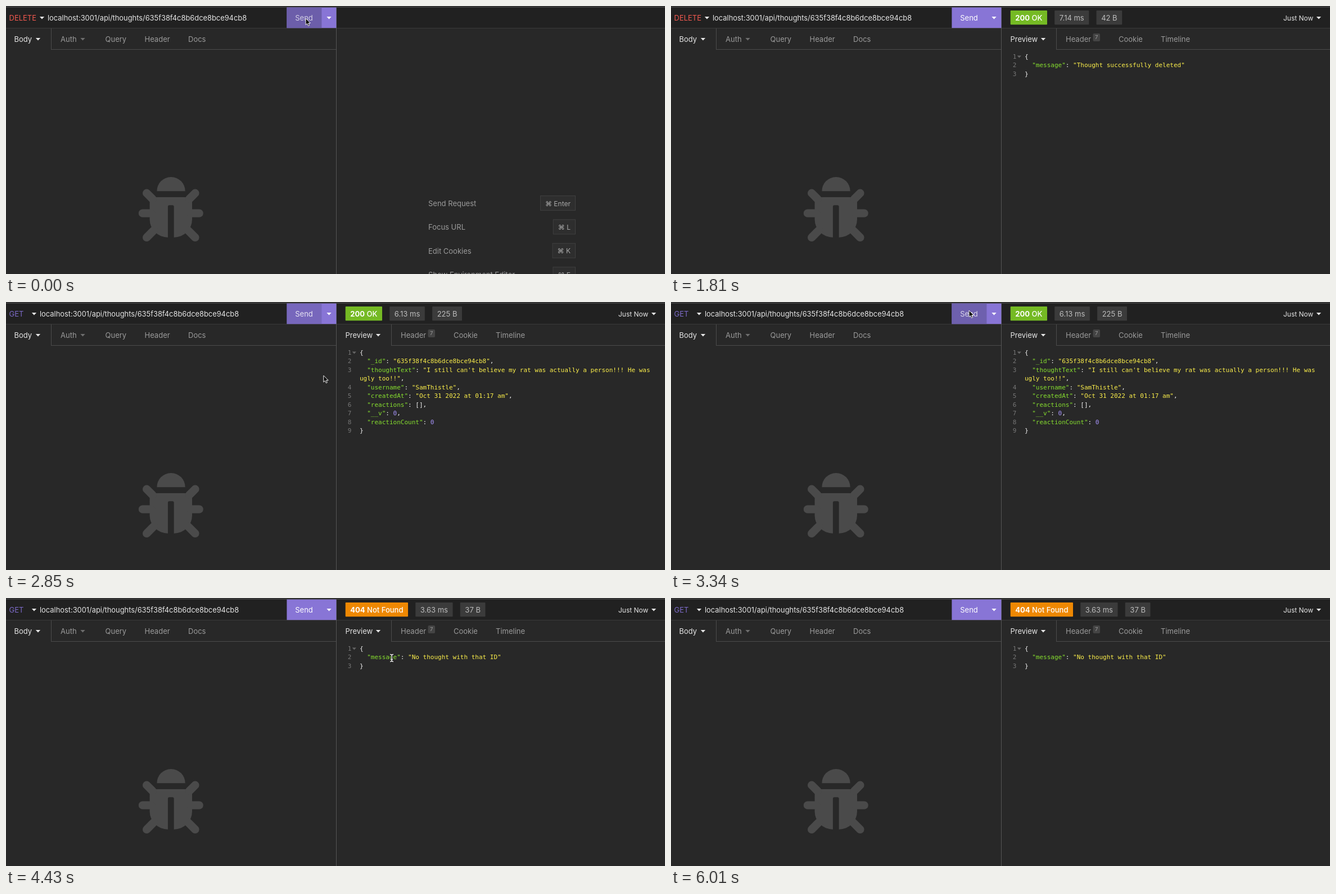
These frames come from a looping animation (1172x478 px, 6060 ms). An HTML page:

```html
<!DOCTYPE html>
<html lang="en">
<head>
<meta charset="utf-8">
<title>API client</title>
<style>
  html, body { margin: 0; width: 100%; height: 100%; overflow: hidden; background: #282828; }
  svg { display: block; width: 1172px; height: 478px; }
  text { font: 13px Inter, "DejaVu Sans", sans-serif; fill: #9b9b9b; white-space: pre; }
  .lit { fill: #e6e6e6; }
  .mid { text-anchor: middle; }
  .url { font-size: 12.87px; fill: #e6e6e6; }
  .age { font-size: 12px; fill: #e6e6e6; }
  .key { font-size: 12px; fill: #a9a9a9; }
  .badge { font-size: 9.5px; text-anchor: middle; }
  .chip { fill: #bdbdbd; }
  .status { fill: #fff; font-weight: 500; }
  .status tspan { font-weight: 700; }
  .code, .num { font: 11px "DejaVu Sans Mono", monospace; fill: #f2f2f2; }
  .num { fill: #777; text-anchor: end; }
  .code .prop { fill: #87e02f; }
  .code .str { fill: #fdf04b; }
  .code .val { fill: #a996ff; }
</style>
</head>
<body>
<svg id="stage" viewBox="0 0 1172 478"></svg>
<script>
const LOOP = 6060, BLINK = 535, FADE = 130;
const URL_TEXT = 'localhost:3001/api/thoughts/635f38f4c8b6dce8bce94cb8';
const GREEN = '#75ba24', ORANGE = '#ee8803', PURPLE = '#8875d6', LINE = '#4b4b4b';

const pen = document.createElement('canvas').getContext('2d');
function widthOf(str, font) {
  pen.font = font + ' Inter, "DejaVu Sans", sans-serif';
  return pen.measureText(str).width;
}

const rect = (x, y, w, h, fill, extra = '') =>
  `<rect x="${x}" y="${y}" width="${w}" height="${h}" fill="${fill}" ${extra}/>`;
// Text is placed by the middle of its line.
const text = (x, mid, str, cls = '', extra = '') =>
  `<text x="${x}" y="${mid + 4.7}" class="${cls}" ${extra}>${str}</text>`;
const caret = (x, y, fill = '#e6e6e6', r = 4.2) =>
  `<path d="M${x - r} ${y - r / 2}h${2 * r}l${-r} ${r * 1.1}z" fill="${fill}"/>`;
const group = (id, body) => `<g id="${id}">${body}</g>`;

function bug() {
  return `<g transform="translate(235.8 305) scale(.2246)" fill="#4a4a4a">
    <path d="M145 112a112 112 0 0 1 224 0z"/>
    <path d="M88 197L125 160H387L424 197V336A144 144 0 0 1 280 480V236q0-12-12-12h-24q-12 0-12 12V480A144 144 0 0 1 88 336z"/>
    <path d="M32 288H100M480 288H412M64 128L110 174M448 128L402 174M64 480L122 422M448 480L390 422"
      stroke="#4a4a4a" stroke-width="64" stroke-linecap="round"/></g>`;
}

function frame() {
  return rect(0, 0, 1172, 39, '#212121') +
    rect(0, 1, 1172, 1.5, '#484848') +
    rect(0, 39, 1172, 1, '#3a3a3a') +
    rect(80, 40, 1, 38, LINE) + rect(80, 77, 507, 1, LINE) +
    rect(587, 3, 1, 475, '#555') +
    text(14.5, 59, 'Body', 'lit') + caret(57, 59) +
    text(97, 59, 'Auth') + caret(136.5, 59, '#6e6e6e') +
    text(176.5, 59, 'Query') + text(246.5, 59, 'Header') + text(324, 59, 'Docs') +
    bug() +
    rect(499.4, 2.6, 88, 36.6, PURPLE) +
    rect(499.4, 2.6, 62, 36.6, '#6c5eaa', 'id="dim"') +
    text(530, 21, 'Send', 'mid', 'id="send" style="fill:#fff"') +
    caret(574.5, 21, '#fff');
}

function address(method, color, x) {
  return text(5.5, 21, method, '', `style="fill:${color}"`) +
    caret(x - 10, 21) + text(x, 21, URL_TEXT, 'url') +
    rect(Math.round(x + widthOf(URL_TEXT, '12.87px')), 12, 1, 18, '#e6e6e6', 'class="blink"');
}

function shortcuts() {
  const rows = { 'Send Request': 'Enter', 'Focus URL': 'L', 'Edit Cookies': 'K', 'Show Environment Editor': 'E' };
  return Object.entries(rows).map(([label, key], i) => {
    const y = 352 + i * 42.4, w = widthOf('⌘ ' + key, '12px') + 17, x = 1012.5 - w;
    return text(751, y, label) +
      rect(x, y - 13.5, w, 26, '#2e2e2e', 'stroke="#3f3f3f"') +
      text(x + 8.5, y - .2, '⌘ ' + key, 'key');
  }).join('');
}

function paint(line) {
  return line.replace(/^~[^"]*"|"[^"]*"|\d+/g, (part, at) => {
    const cls = /^\d/.test(part) ? 'val' : line[at + part.length] === ':' ? 'prop' : 'str';
    return `<tspan class="${cls}">${part.replace('~', '')}</tspan>`;
  });
}

// A line that starts with "~" continues the one before.
function code(source) {
  let n = 0;
  return source.split('\n').map((line, i) => {
    const y = 89.3 + i * 15.44, body = line.trimStart();
    const number = line[0] === '~' ? '' : text(614.3, y, ++n, 'num');
    return number + text(629 + (line.length - body.length) * 6.62, y, paint(body), 'code');
  }).join('');
}

function chips(color, status, reason, ...facts) {
  const box = (x, w, fill) => rect(x, 8, w, 25.2, fill, 'rx="1"');
  const pad = 8.6, gap = 13.2;
  let x = 603.7;
  let w = widthOf(status, '700 13px') + widthOf(' ' + reason, '500 13px') + 2 * pad;
  let out = box(x, w, color) + text(x + pad, 20.8, `<tspan>${status}</tspan> ${reason}`, 'status');
  for (const fact of facts) {
    x += w + gap;
    w = widthOf(fact, '13px') + 2 * pad;
    out += box(x, w, '#3b3b3b') + text(x + pad, 20.8, fact, 'chip');
  }
  return out;
}

function response(head, source) {
  return head +
    text(1089, 21, 'Just Now', 'age') + caret(1152, 21) +
    rect(685, 40, 1, 38, LINE) + rect(685, 77, 487, 1, LINE) +
    text(603.5, 59, 'Preview', 'lit') + caret(662, 59) +
    text(702, 59, 'Header') + rect(750.5, 49, 12.5, 14, '#444', 'rx="2"') +
    text(756.7, 54.5, '7', 'badge') +
    text(796, 59, 'Cookie') + text(871, 59, 'Timeline') +
    code(source);
}

const panes = {
  empty: shortcuts(),
  deleted: response(chips(GREEN, 200, 'OK', '7.14 ms', '42 B'), `{
  "message": "Thought successfully deleted"
}`),
  found: response(chips(GREEN, 200, 'OK', '6.13 ms', '225 B'), `{
  "_id": "635f38f4c8b6dce8bce94cb8",
  "thoughtText": "I still can't believe my rat was actually a person!!! He was
~ugly too!!",
  "username": "SamThistle",
  "createdAt": "Oct 31 2022 at 01:17 am",
  "reactions": [],
  "__v": 0,
  "reactionCount": 0
}`.replace('He was\n', 'He was"\n')).replace('He was"', 'He was'),
  missing: response(chips(ORANGE, 404, 'Not Found', '3.63 ms', '37 B'), `{
  "message": "No thought with that ID"
}`)
};

const beam = 'M-3 -6.5Q0 -6.5 0 -4.5Q0 -6.5 3 -6.5M0 -4.5V4.5M-3 6.5Q0 6.5 0 4.5Q0 6.5 3 6.5M-2 2.5H2';
const pointers =
  group('arrow', `<path d="M0 0V11.6L2.7 9.2L4.5 13.4L6.5 12.5L4.8 8.5H8.4z" fill="#0b0b0b"
    stroke="#f2f2f2" stroke-linejoin="round"/>`) +
  group('beam', `<path d="${beam}" fill="none" stroke="#1a1a1a" stroke-width="3.2"/>
    <path d="${beam}" fill="none" stroke="#f2f2f2" stroke-width="1.4"/>`);

const $ = id => document.getElementById(id);
$('stage').innerHTML = frame() +
  group('DELETE', address('DELETE', '#f2594f', 74)) +
  group('GET', address('GET', '#7d6bc9', 60)) +
  Object.entries(panes).map(([id, body]) => group(id, body)).join('') +
  group('fold', caret(619.3, 90.3, '#666', 3.6)) + pointers;

// The fold mark appears at "fold"; the text caret blinks from "focus".
const scenes = [
  { from: 0, method: 'DELETE', pane: 'empty' },
  { from: 200, method: 'DELETE', pane: 'deleted', focus: 205, fold: 930 },
  { from: 2200, method: 'GET', pane: 'found', fold: 2560 },
  { from: 3573, method: 'GET', pane: 'found', focus: 3573, fold: 2560 },
  { from: 3640, method: 'GET', pane: 'missing', focus: 3573, fold: 4200 },
  { from: 6010, method: 'GET', pane: 'missing', fold: 4200 }
];

// Each pointer move: start, end, x, y
const moves = [
  [0, 1, 533, 22], [660, 670, 539, 22], [690, 960, 743, 110], [960, 1270, -20, 250],
  [2400, 2680, 510, 24], [2790, 2960, 603, 206], [3020, 3340, 530, 15],
  [3940, 4290, 801, 115], [4290, 4430, 685.5, 107], [4430, 4680, 752, 108],
  [4860, 5030, 1063, 420], [5180, 5410, 1150, 500]];

const easeOut = p => 1 - (1 - p) ** 2;

function pointer(t) {
  let [, , x, y] = moves[0];
  for (const [start, end, toX, toY] of moves) {
    if (t < start) break;
    const p = easeOut(Math.min(1, (t - start) / (end - start)));
    x += (toX - x) * p;
    y += (toY - y) * p;
  }
  return [x, y];
}

function overSend(t) {
  const [x, y] = pointer(Math.max(0, t));
  return x >= 499 && x < 561 && y < 39;
}

// The button tint follows the pointer with a linear fade.
function tint(t, steps = 26) {
  let hits = 0;
  for (let i = 0; i < steps; i++) hits += overSend(t - FADE * i / steps);
  return hits / steps;
}

const show = (el, on) => { el.style.display = on ? '' : 'none'; };

function render(t) {
  const scene = scenes.filter(s => s.from <= t).pop();
  Object.keys(panes).forEach(id => show($(id), id === scene.pane));
  ['DELETE', 'GET'].forEach(id => show($(id), id === scene.method));
  const blink = (t - scene.focus) % (2 * BLINK) < BLINK;
  document.querySelectorAll('.blink').forEach(el => show(el, blink));
  show($('fold'), t >= scene.fold);

  const dim = tint(t);
  $('dim').setAttribute('opacity', dim);
  $('send').setAttribute('fill-opacity', 1 - dim * .3);

  const [x, y] = pointer(t);
  const overCode = x > 626 && y > 82;
  show($('arrow'), !overCode);
  show($('beam'), overCode);
  $(overCode ? 'beam' : 'arrow').setAttribute('transform', `translate(${x} ${y})`);
}

const start = performance.now();
function tick() {
  render((performance.now() - start) % LOOP);
  requestAnimationFrame(tick);
}
tick();
</script>
</body>
</html>
```
